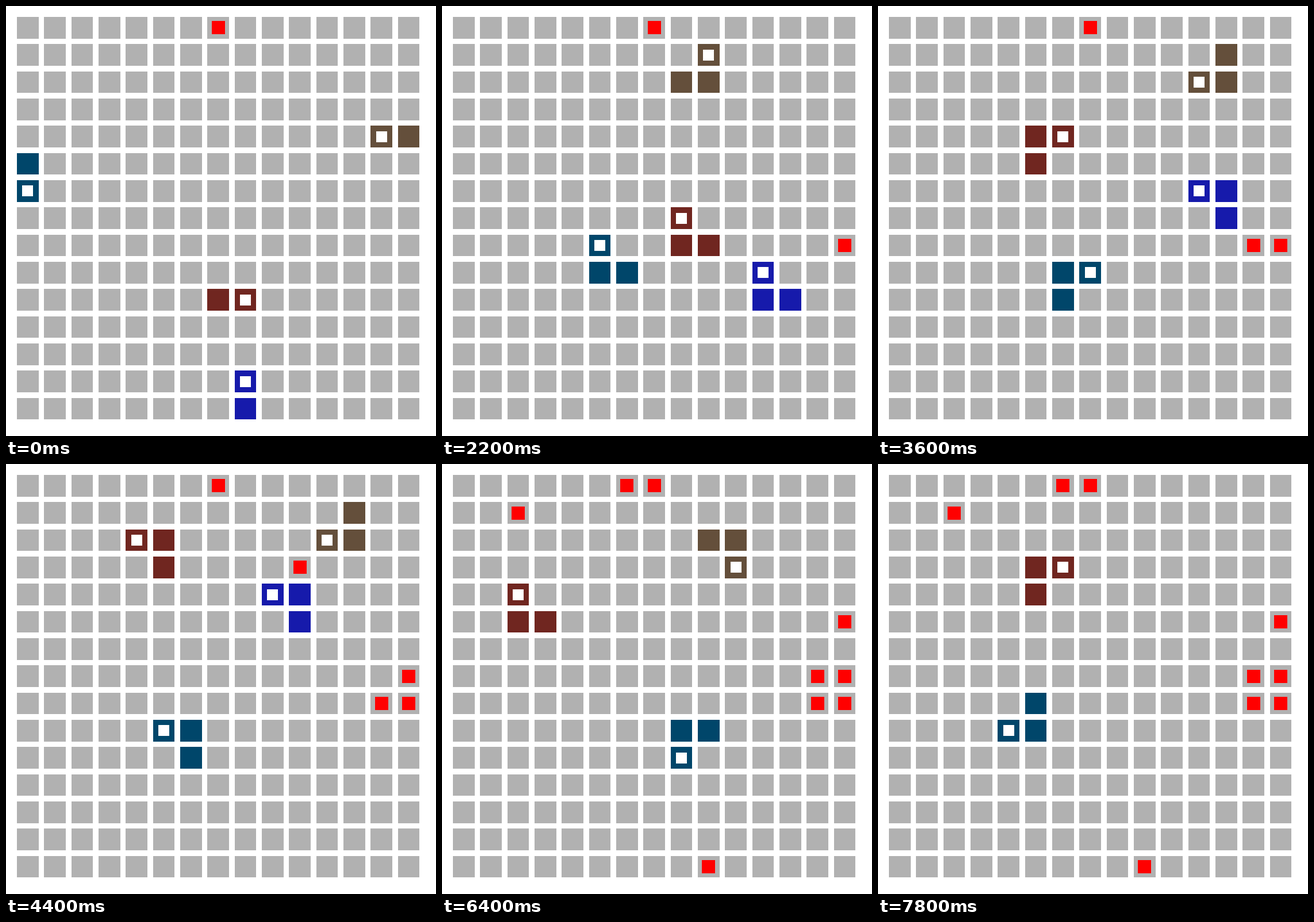
Recreate the animation shown at these times as an HTML page with a canvas. Size 748 px wide and 748 px high, loop 8000 ms.

```html
<!DOCTYPE html>
<html lang="en">
<head>
<meta charset="utf-8">
<title>Snakes on a grid</title>
<style>
  html, body { margin: 0; width: 100%; height: 100%; overflow: hidden; background: #fff; }
  canvas { display: block; width: 748px; height: 748px; }
</style>
</head>
<body>
<canvas id="stage" width="748" height="748"></canvas>
<script>
const ctx = document.getElementById('stage').getContext('2d');
const SIZE = 15, PITCH = 710 / 15, CELL = PITCH * 0.8, ORIGIN = 18.9;
const STEP = 200, TICKS = 40, LENGTH = 3;
const DIRS = { L: [-1, 0], R: [1, 0], U: [0, -1], D: [0, 1] };

// Each route starts at the tail; the head is one move ahead at tick 0.
const snakes = [
  { color: '#644f3b', start: [14, 4], end: 38,
    moves: 'L LLLLLL UURRU RDRURDL URDL DDLDLUUURD LULLD' },
  { color: '#00466a', start: [0, 5], end: TICKS,
    moves: 'D DRRRRR RDDLU RRDDLUR DLUL URURRDRDLD LULULDL' },
  { color: '#702620', start: [7, 10], end: TICKS,
    moves: 'R RRRUUL ULDLU LULULUR ULUL LDRRDLDLLU URDRRUR' },
  { color: '#161aab', start: [8, 14], end: 27,
    moves: 'U UURRDR RUULU ULURRUL LUUL LDDR' }
];
for (const snake of snakes) {
  snake.path = [snake.start];
  for (const move of snake.moves.replace(/ /g, '')) {
    const [x, y] = snake.path[snake.path.length - 1];
    const [dx, dy] = DIRS[move];
    snake.path.push([x + dx, y + dy]);
  }
}

const foods = [
  { at: [7, 0], from: 0 },
  { at: [14, 8], from: 3 },
  { at: [13, 8], from: 15 },
  { at: [10, 3], from: 20, to: 32 },
  { at: [14, 7], from: 21 },
  { at: [2, 1], from: 23 },
  { at: [13, 7], from: 25 },
  { at: [14, 5], from: 27 },
  { at: [9, 14], from: 29 },
  { at: [6, 0], from: 32 }
];

function square([col, row], scale, color) {
  const inset = CELL * (1 - scale) / 2;
  const edge = n => Math.round(ORIGIN + n * PITCH + inset);
  const end = n => Math.round(ORIGIN + n * PITCH + CELL - inset);
  ctx.fillStyle = color;
  ctx.fillRect(edge(col), edge(row), end(col) - edge(col), end(row) - edge(row));
}

function draw(tick) {
  ctx.fillStyle = '#fff';
  ctx.fillRect(0, 0, 748, 748);
  for (let i = 0; i < SIZE * SIZE; i++) {
    square([i % SIZE, Math.floor(i / SIZE)], 1, '#b1b1b1');
  }
  for (const { at, from, to = TICKS } of foods) {
    if (tick >= from && tick < to) square(at, 0.6, '#f00');
  }
  for (const { path, color, end } of snakes) {
    if (tick >= end) continue;
    const head = tick + 1;
    for (let i = Math.max(0, head - LENGTH + 1); i <= head; i++) square(path[i], 1, color);
    square(path[head], 0.5, '#fff');
  }
}

let shown = -1;
const began = performance.now();
function frame() {
  const tick = Math.floor((performance.now() - began) / STEP) % TICKS;
  if (tick !== shown) draw(shown = tick);
  requestAnimationFrame(frame);
}
frame();
</script>
</body>
</html>
```
